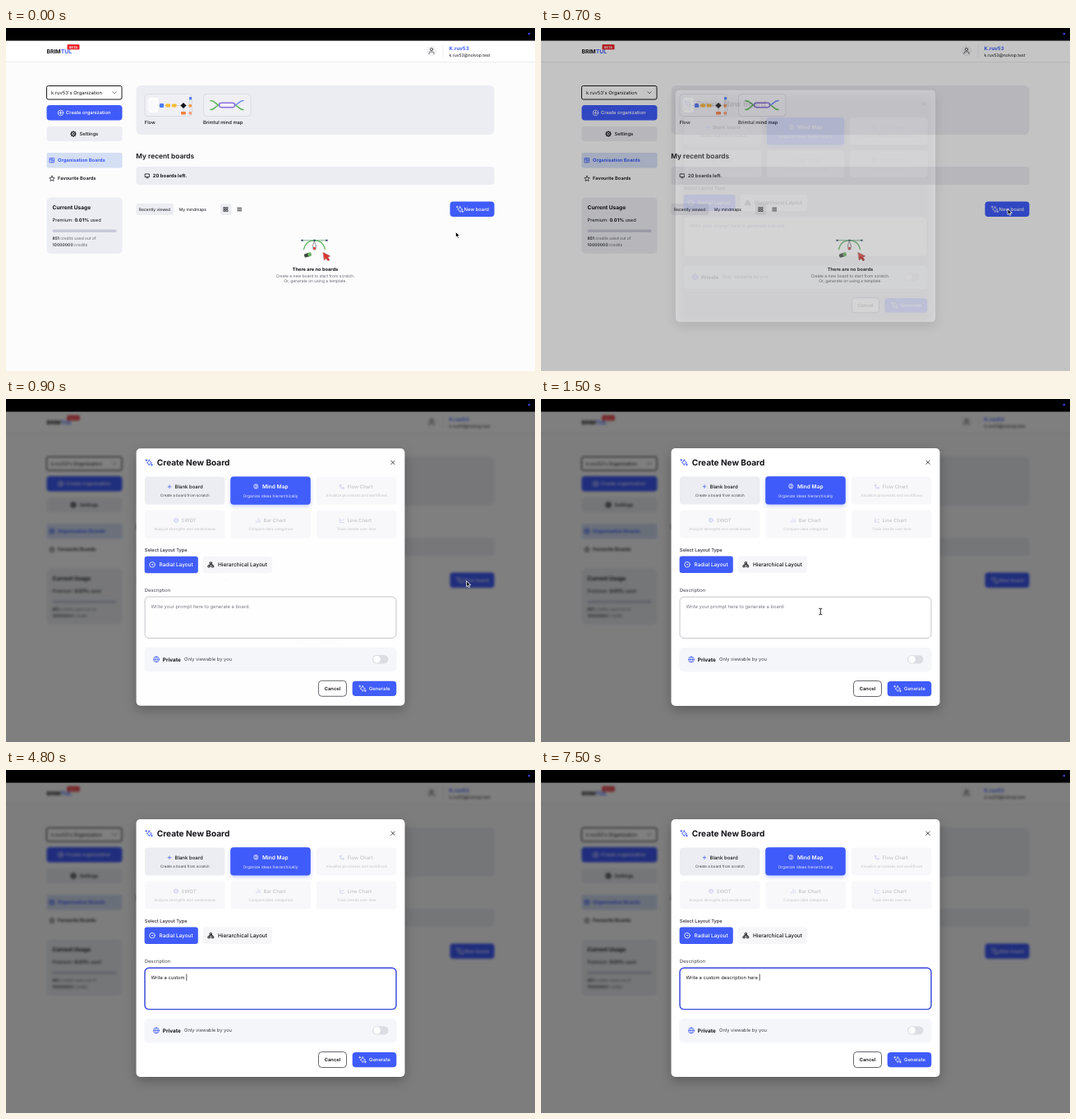
Write an HTML page with a canvas that moves like this. It is 644x418 px and loops after 8000 ms.

```html
<!DOCTYPE html>
<html lang="en">
<head>
<meta charset="utf-8">
<title>Create New Board</title>
<style>
  html, body { margin: 0; width: 100%; height: 100%; overflow: hidden; background: #fff; }
  canvas { display: block; width: 644px; height: 418px; }
</style>
</head>
<body>
<canvas id="stage" width="644" height="418"></canvas>
<script>
const W = 644, H = 418, LOOP = 8000;
const BLUE = '#3f5bfa', INK = '#141418', GREY = '#ecedf2', MUTED = '#66676e', FAINT = '#c3c4c9';
const stage = document.getElementById('stage').getContext('2d');
const page = makeLayer(), sheet = makeLayer();
let c = stage;

function makeLayer() {
  const el = document.createElement('canvas');
  el.width = W;
  el.height = H;
  return el.getContext('2d');
}

const clamp = v => Math.max(0, Math.min(1, v));
const span = (t, from, to) => clamp((t - from) / (to - from));
const easeOut = p => 1 - (1 - p) * (1 - p);
const easeInOut = p => p * p * (3 - 2 * p);
const mix = (a, b, p) => a + (b - a) * p;

// y is the middle of the capitals; returns the x where the text ends
function text(str, x, y, size, color = INK, weight = 400, align = 'left') {
  c.font = `${weight} ${size}px Inter, "Open Sans", sans-serif`;
  c.textRendering = 'geometricPrecision';
  c.textAlign = align;
  c.fillStyle = color;
  c.fillText(str, x, y + size * 0.36);
  return x + c.measureText(str).width;
}

function box(x1, y1, x2, y2, r, fill, stroke, width = 1) {
  c.beginPath();
  c.roundRect(x1, y1, x2 - x1, y2 - y1, r);
  if (fill) { c.fillStyle = fill; c.fill(); }
  if (stroke) { c.strokeStyle = stroke; c.lineWidth = width; c.stroke(); }
}

function icon(d, x, y, color, width = 0.8, fill) {
  c.save();
  c.translate(x, y);
  c.lineWidth = width;
  c.lineCap = c.lineJoin = 'round';
  c.strokeStyle = color;
  const path = new Path2D(d);
  if (fill) { c.fillStyle = fill; c.fill(path); }
  if (width) c.stroke(path);
  c.restore();
}

const ring = r => `M${r} 0A${r} ${r} 0 1 1 ${-r} 0A${r} ${r} 0 1 1 ${r} 0Z`;
const square = r => `M${-r} ${-r}H${r}V${r}H${-r}Z`;

const ICON = {
  sparkle: 'M.3-3Q.8-.2 3.4.4Q.8 1 .3 3.8Q-.2 1-2.8.4Q-.2-.2.3-3ZM-3.2-3.6V-1.6M-4.2-2.6H-2.2M3.4 2V4M2.4 3H4.4',
  plus: 'M-1.9 0H1.9M0-1.9V1.9',
  cross: 'M-2.2-2.2L2.2 2.2M2.2-2.2L-2.2 2.2',
  person: 'M-3 3.4V2.6Q-3 .9-1.2.9H1.2Q3 .9 3 2.6V3.4M1.6-2A1.6 1.6 0 1 1-1.6-2A1.6 1.6 0 1 1 1.6-2Z',
  chevron: 'M-2-1L0 1L2-1',
  star: 'M0-3.2L.9-1L3.2-.8L1.5.8L2 3.1L0 1.9L-2 3.1L-1.5.8L-3.2-.8L-.9-1Z',
  board: 'M-2.6-2.6H2.6V2.6H-2.6ZM0-2.6V2.6M0 0H2.6M-2.6-.6H0',
  grid: 'M-2.4-2.4H-.6V-.6H-2.4ZM.6-2.4H2.4V-.6H.6ZM-2.4.6H-.6V2.4H-2.4ZM.6.6H2.4V2.4H.6Z',
  list: 'M-2.4-1.8H2.4M-2.4 0H2.4M-2.4 1.8H2.4',
  screen: 'M-2.5-2.3H2.5V1.3H-2.5ZM-1 2.6H1',
  brain: 'M-.5-2.7Q-3.2-2.6-2.6-.2Q-3.2 2.6-.5 2.7ZM1-2.6Q2.8-2 1.6-.5L2.6 0L1.6.8Q2.8 2 1 2.7',
  flow: 'M-2.4-2.4H-.8V-.8H-2.4ZM.8.8H2.4V2.4H.8ZM-1.6-.8V1.6H.8',
  bars: 'M-2.2 2.4V.6M0 2.4V-2.4M2.2 2.4V-.8',
  trend: 'M-2.5-2.5V2.5H2.5M-1.3.6L0-.8L1 .2L2.5-1.6',
  tree: 'M-1-3H1V-1H-1ZM-3.2 1H-1.2V3H-3.2ZM1.2 1H3.2V3H1.2ZM0-1V0M-2.2 1V0H2.2V1',
  globe: ring(3.5) + 'M-3.5 0H3.5M0-3.5Q-3 0 0 3.5Q3 0 0-3.5',
  arrow: 'M0 0L.2 6.4L1.7 5L2.8 7.4L4 6.8L2.9 4.5L5 4.3Z',
  beam: 'M-1.6-3.8Q0-3.8 0-2.8Q0-3.8 1.6-3.8M0-2.8V2.8M-1.6 3.8Q0 3.8 0 2.8Q0 3.8 1.6 3.8'
};

function drawThumbs() {
  const edge = '#d6d7de';
  box(169, 80.5, 226.5, 107.5, 4, '#efeff4', edge, 0.8);
  box(240.5, 80.5, 298, 107.5, 4, '#efeff4', edge, 0.8);
  box(174, 85, 185.5, 103, 1, '#fff');
  box(172.5, 87, 183, 101, 1, '#fafafc');
  icon('M185 94.5H224M216 94.5V104M224 86V104', 0, 0, '#b9bcc8', 0.5);
  box(187, 92, 192, 97, 0.8, '#4f7df5');
  box(194.5, 92.5, 200, 96.5, 0.8, '#f7bd31');
  box(202, 92.5, 207.5, 96.5, 0.8, '#f7bd31');
  icon('M0-3.6L3.6 0L0 3.6L-3.6 0Z', 216, 94.5, '', 0, '#15151c');
  box(223, 84, 226, 87.5, 0.8, '#4f7df5');
  box(222.5, 93, 226, 96.5, 0.8, '#f59a4c');
  box(213, 102, 219, 105.5, 0.8, '#f5823c');
  box(222.5, 102, 226, 105.5, 0.8, '#f5a070');

  const curve = 'M0 0C-5 0-5-5.5-11-5.5';
  const flip = 'M0 0C5 0 5-5.5 11-5.5';
  icon(curve, 260, 94, '#62b95f', 1.6);
  icon('M0 0C-5 0-5 5.5-11 5.5', 260, 94, '#62b95f', 1.6);
  icon(flip, 278, 94, '#7891ee', 1.6);
  icon('M0 0C5 0 5 5.5 11 5.5', 278, 94, '#62b95f', 1.6);
  box(259.5, 91.3, 278.5, 96.7, 2.6, '#f1effa', '#8a70dc', 1.4);
}

function drawEmptyState() {
  icon('M-13 11Q-11 0 0 0Q11 0 13 11', 375.5, 259, '#58b65c', 1.1);
  icon('M-15 0H15', 375.5, 258.8, '#3f8a52', 0.7);
  for (const x of [360.5, 375.5, 390.5]) icon(square(1), x, 258.8, '', 0, '#23385c');
  icon('M0-4.5L2 0L1.4 5H-1.4L-2 0Z', 375.5, 265, '#55555c', 0.6, '#f2f2f4');
  icon('M-1.4 2H1.4V5H-1.4Z', 375.5, 265, '', 0, '#d9443c');
  c.save();
  c.translate(367.5, 276.5);
  c.rotate(-0.3);
  box(-4.5, -2.2, 4, 2.2, 1.6, '#3c4a40');
  box(0, -2.2, 4.4, 2.2, 1.6, '#69b85c');
  c.restore();
  icon('M-3.8-4.8L4.5-.6L1.6.8L3.8 4L2 5.3L-.3 2.2L-2.4 4Z', 390, 278.5, '#8d2520', 0.5, '#e03a30');
  text('There are no boards', 376.5, 294, 5.7, INK, 700, 'center');
  text('Create a new board to start from scratch.', 376.5, 302, 4.95, MUTED, 400, 'center');
  text('Or, generate on using a template.', 376.5, 308.7, 4.9, MUTED, 400, 'center');
}

function drawPage() {
  c = page;
  c.fillStyle = '#fcfcfd';
  c.fillRect(0, 0, W, H);
  c.fillStyle = '#fff';
  c.fillRect(0, 0, W, 41);
  c.fillStyle = '#e9e9ee';
  c.fillRect(0, 41, W, 0.8);

  // Header
  const end = text('BRIM', 49.5, 28.7, 6.8, INK, 700);
  text('TUL', end, 28.7, 6.8, BLUE, 700);
  box(74.5, 20, 89.5, 26.2, 1, '#e8262b');
  text('BETA', 82, 23.2, 3.9, '#fff', 600, 'center');
  icon(ring(6.5), 518, 28, '', 0, '#f3f3f6');
  icon(ICON.person, 518, 28, '#333', 0.7);
  box(531.8, 20, 532.4, 36, 0, '#e4e4ea');
  text('K.ruv53', 539.5, 25, 6.1, BLUE, 700);
  text('k.ruv53@nolvop.test', 539.5, 32.7, 5.1);

  // Side column
  box(49.5, 70.5, 141, 87, 2, '#fff', '#1a1a1e', 1);
  text("k.ruv53's Organization", 55, 78.7, 5.8);
  icon(ICON.chevron, 132, 78.8, '#333', 0.7);
  box(49.5, 94, 141.5, 112.5, 4, BLUE);
  icon(ring(3.3) + ICON.plus, 66.5, 103.4, '#fff', 0.7);
  text('Create organization', 73, 103.3, 5.8, '#fff', 500);
  box(49.5, 120, 141.5, 138, 4, GREY);
  icon(ring(2.5), 82, 129, INK, 1.2);
  icon(ring(0.8), 82, 129, INK, 0.7);
  for (let i = 0; i < 8; i++) {
    const a = i * Math.PI / 4, x = Math.cos(a), y = Math.sin(a);
    icon(`M${x * 2.8} ${y * 2.8}L${x * 3.3} ${y * 3.3}`, 82, 129, INK, 1);
  }
  text('Settings', 89.5, 128.9, 5.8, INK, 500);
  box(49.5, 152, 141.5, 170.5, 2, '#d4dff4');
  icon(ICON.board, 56, 161.2, BLUE, 0.8);
  text('Organisation Boards', 63, 161.2, 5.8, BLUE, 700);
  icon(ICON.star, 56, 183.4, INK, 0.7);
  text('Favourite Boards', 63, 183.4, 5.7, INK, 600);

  box(49.5, 206.5, 141.5, 275, 5, GREY);
  text('Current Usage', 56.5, 218.3, 6.6, INK, 700);
  let x = text('Premium: ', 56.5, 234.4, 5.7);
  x = text('0.01%', x, 234.4, 5.7, INK, 700);
  text(' used', x, 234.4, 5.7);
  box(56.5, 245.5, 134.5, 249, 1.7, '#c8c9d8');
  x = text('851', 56.5, 256.2, 4.9, '#33343a', 700);
  text(' credits used out of', x, 256.2, 4.9, MUTED);
  x = text('10000000', 56.5, 264, 5, '#33343a', 600);
  text(' credits', x, 264, 5, MUTED);

  // Main column
  box(158.5, 70, 594.5, 130, 6, GREY);
  drawThumbs();
  text('Flow', 168.8, 115.2, 5.7, INK, 500);
  text('Brimtul mind map', 240, 115.2, 5.8, INK, 500);
  text('My recent boards', 158.3, 156.2, 8.35, INK, 600);
  box(158.5, 169, 594.5, 191, 4, GREY);
  icon(ICON.screen, 172, 180.2, INK, 0.8);
  text('20 boards left.', 178.8, 180.2, 5.85, INK, 700);
  box(158.5, 214, 204, 228, 2, GREY);
  text('Recently viewed', 161.8, 221, 4.95);
  text('My mindmaps', 210.7, 221, 5);
  box(261, 214.3, 274.3, 227.7, 2, GREY);
  icon(ICON.grid, 267.6, 221, INK, 0.7);
  icon(ICON.list, 284.2, 221, INK, 0.8);
  box(540.5, 211.5, 594.5, 230, 4, BLUE);
  icon(ICON.sparkle, 552.5, 220.7, '#fff', 0.7);
  text('New board', 557.5, 220.8, 5.85, '#fff', 500);
  drawEmptyState();
}

function card(x, y, title, note, glyph, titleX, off = true) {
  box(x, y, x + 97.5, y + 34, 4, off ? '#f8f8fa' : GREY);
  icon(ICON[glyph] || glyph, titleX - 6.5, y + 12.2, off ? '#c9cdf0' : BLUE, 0.7);
  text(title, titleX, y + 12.2, 6, off ? FAINT : INK, 500);
  text(note, x + 48.7, y + 23, 4.5, off ? FAINT : '#3c3d44', 400, 'center');
}

// Text typed so far: one moment per character
const PROMPT = 'Write a custom description here ';
const KEYS = [20, 24, 27, 30, 31, 32, 34, 36, 37, 39, 40, 42, 43, 45, 48, 49,
  51, 53, 55, 57, 59, 60, 62, 63, 65, 67, 68, 70, 71, 73, 74, 75];
const typed = t => PROMPT.slice(0, KEYS.filter(k => k * 100 <= t).length);

function drawForm(t) {
  const focus = span(t, 1520, 1800), value = typed(t);
  text('Description', 168.8, 233, 5.8, '#44454c');
  box(169, 241.2, 475, 291.6, 5, '#fff', '#c4c5ca', 1);
  if (focus) {
    c.save();
    c.globalAlpha = focus;
    box(169, 241.2, 475, 291.6, 5, null, '#3a4de0', 1.4);
    c.restore();
  }
  if (!value) text('Write your prompt here to generate a board.', 176.5, 252.6, 5.8, '#77787f');
  const end = text(value, 176.5, 252.6, 5.8);
  if (focus > 0.3) box(end + 0.3, 248.6, end + 1, 256.8, 0, INK);

  box(168.5, 303, 475.5, 332.5, 5, '#f5f6fa');
  icon(ICON.globe, 183, 317.5, BLUE, 0.7);
  text('Private', 190.8, 317.4, 6.4, INK, 700);
  text('Only viewable by you', 217, 317.4, 5.75, '#44454c');
  box(446, 312.2, 465.5, 322.6, 5.2, '#dcdde3');
  icon(ring(4.3), 451.6, 317.4, '', 0, '#fff');
  box(380.5, 343.5, 414.5, 362.5, 4, '#fff', '#55565c', 0.9);
  text('Cancel', 397.5, 353, 5.8, INK, 600, 'center');
  box(421.7, 344, 475.3, 362.3, 4, BLUE);
  icon(ICON.sparkle, 434, 352.8, '#fff', 0.7);
  text('Generate', 442, 353, 5.9, '#fff', 500);
}

function drawSheet(t, gap) {
  icon(ICON.sparkle, 174, 77, BLUE, 0.9);
  text('Create New Board', 183.8, 77.2, 10.05, INK, 700);
  icon(ICON.cross, 471, 77.2, '#222', 0.8);

  card(169, 94.5, 'Blank board', 'Create a board from scratch', 'plus', 205.5, false);
  c.save();
  c.shadowColor = 'rgba(63,91,250,.3)';
  c.shadowBlur = 5;
  c.shadowOffsetY = 2;
  box(273.2, 94.2, 370.8, 128.6, 4, BLUE);
  c.restore();
  icon(ICON.brain, 304.5, 106.3, '#fff', 0.8);
  text('Mind Map', 312, 106.2, 6.6, '#fff', 600);
  text('Organize ideas hierarchically', 322, 118, 4.9, '#e6eaff', 400, 'center');
  card(378, 94.5, 'Flow Chart', 'Visualize processes and workflows', 'flow', 415.5);
  card(169, 135.5, 'SWOT', 'Analyze strengths and weaknesses', ring(2.6) + square(1.2), 213.5);
  card(273.5, 135.5, 'Bar Chart', 'Compare data categories', 'bars', 313.5);
  card(378, 135.5, 'Line Chart', 'Track trends over time', 'trend', 415.5);

  text('Select Layout Type', 168.8, 183.6, 5.7, '#2a2b31', 500);
  box(168.6, 191.5, 233.8, 212, 3, BLUE);
  icon(ring(3.3) + ring(0.4), 178, 201.7, '#fff', 0.8);
  text('Radial Layout', 186.5, 201.7, 6.45, '#fff', 500);
  box(239.7, 191.5, 324, 212, 3, '#f6f6f9');
  icon(ICON.tree, 249.5, 201.8, INK, 0.9);
  text('Hierarchical Layout', 258, 201.7, 6.5, INK, 500);

  c.translate(0, -gap);
  drawForm(t);
}

// The dialog grows while the space above the form opens
function drawModal(t, e) {
  const s = mix(0.95, 1, e), gap = 34 * (1 - e), height = 314 - gap;
  const place = k => k.setTransform(s, 0, 0, s, 322 * (1 - s), 217 - s * (height / 2 + 60));

  c.save();
  place(c);
  c.globalAlpha = mix(0.1, 1, e);
  c.shadowColor = 'rgba(0,0,0,.25)';
  c.shadowBlur = 14;
  c.shadowOffsetY = 5;
  box(158.5, 60, 485.5, 60 + height, 5, '#fff');
  c.restore();

  if (e < 1) {
    c.save();
    place(c);
    c.beginPath();
    c.roundRect(158.5, 60, 327, height, 5);
    c.clip();
    c.resetTransform();
    c.globalAlpha = 1 - e;
    c.globalCompositeOperation = 'multiply';
    c.drawImage(page.canvas, 0, 0);
    c.restore();
  }

  c = sheet;
  c.resetTransform();
  c.clearRect(0, 0, W, H);
  place(c);
  drawSheet(t, gap);
  c = stage;
  c.globalAlpha = e * e;
  c.drawImage(sheet.canvas, 0, 0);
  c.globalAlpha = 1;
}

function drawPointer(t) {
  if (t >= 2000) return;
  const a = easeInOut(span(t, 20, 400)), b = easeInOut(span(t, 830, 1480));
  const x = mix(mix(547.3, 568, a), 340.3, b);
  const y = mix(mix(248.8, 221, a), 259, b);
  if (b && x < 475 && y > 241) icon(ICON.beam, x, y, '#111', 0.9);
  else icon(ICON.arrow, x, y, '#fff', 0.8, '#000');
}

function draw(t) {
  c = stage;
  const e = easeOut(span(t, 647, 927));
  c.drawImage(page.canvas, 0, 0);
  if (e) {
    c.filter = `blur(${1.7 * e}px)`;
    c.drawImage(page.canvas, 0, 0);
    c.filter = 'none';
    c.fillStyle = `rgba(0,0,0,${0.5 * e ** 0.75})`;
    c.fillRect(0, 0, W, H);
    drawModal(t, e);
  }
  c.fillStyle = '#000';
  c.fillRect(0, 0, W, 15.5);
  icon(ring(1.3), 636.8, 7, '', 0, '#3b46e8');
  drawPointer(t);
}

drawPage();
const start = performance.now();
function tick() {
  draw((performance.now() - start) % LOOP);
  requestAnimationFrame(tick);
}
tick();
</script>
</body>
</html>
```
